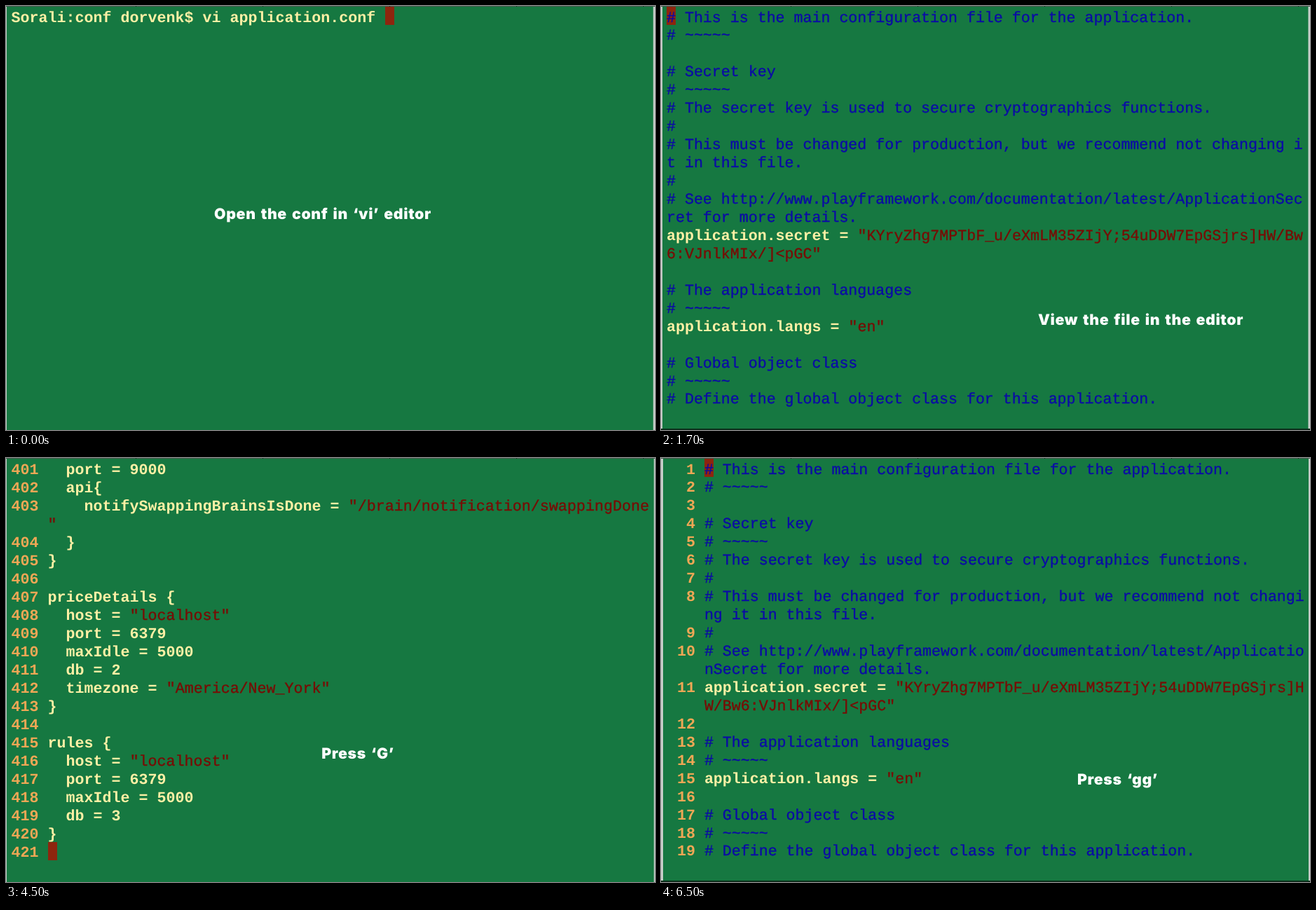
Animation, 926 px wide and 605 px high, one loop 8 s. Source, as an HTML page:

```html
<!DOCTYPE html>
<html lang="en">
<head>
<meta charset="utf-8">
<title>vi walkthrough</title>
<style>
  html, body { margin: 0; width: 100%; height: 100%; overflow: hidden; background: #167841; }
  svg { display: block; position: absolute; left: 0; top: 0; }
  text { white-space: pre; text-rendering: geometricPrecision; }
  .code { font-family: "Liberation Mono", "Courier New", monospace; stroke-width: .35px; }
  .bold { font-weight: 700; stroke-width: 0; }
  .caption {
    font: 900 21.3px Inter, "Arial Black", sans-serif;
    letter-spacing: .03em; word-spacing: .1em;
    text-anchor: middle; fill: #fff;
  }
</style>
</head>
<body>
<svg id="stage" width="926" height="605" viewBox="0 0 926 605"></svg>
<script>
const COLS = 70, GUTTER = 4, LOOP = 8000;
const C = {
  bg: '#167841', plain: '#fff0a5', note: '#0b0ba6', str: '#780c05',
  num: '#f0a755', cursor: '#8e250e', edge: '#c9cfcb', top: '#46594e', base: '#0c2f1c'
};

const head = `# This is the main configuration file for the application.
# ~~~~~

# Secret key
# ~~~~~
# The secret key is used to secure cryptographics functions.
#
# This must be changed for production, but we recommend not changing it in this file.
#
# See http://www.playframework.com/documentation/latest/ApplicationSecret for more details.
application.secret = "KYryZhg7MPTbF_u/eXmLM35ZIjY;54uDDW7EpGSjrs]HW/Bw6:VJnlkMIx/]<pGC"

# The application languages
# ~~~~~
application.langs = "en"

# Global object class
# ~~~~~
# Define the global object class for this application.`;

const tail = `  port = 9000
  api{
    notifySwappingBrainsIsDone = "/brain/notification/swappingDone"
  }
}

priceDetails {
  host = "localhost"
  port = 6379
  maxIdle = 5000
  db = 2
  timezone = "America/New_York"
}

rules {
  host = "localhost"
  port = 6379
  maxIdle = 5000
  db = 3
}
`;

// x, y: first column and baseline; w, h: cell size; edges: left, right, bottom of the window
const screens = [
  { at: 0, x: 7.5, y: 22.5, w: 13, h: 26, edges: [1, 923.5, 605],
    text: 'Sorali:conf dorvenk$ vi application.conf ', cursor: [41, 0],
    caption: ['Open the conf in ‘vi’ editor', 452, 303.5] },
  { at: 500, x: 8, y: 22.5, w: 12.98, h: 25.95, edges: [2, 923.5, 603],
    text: head, cursor: [0, 0],
    caption: ['View the file in the editor', 684.5, 455] },
  { at: 2500, x: 7, y: 21, w: 13.03, h: 26.1,
    text: head, first: 1, cursor: [4, 0], command: ':set number',
    caption: ['On the no-line', 633.5, 448] },
  { at: 4500, x: 7.5, y: 22.5, w: 13.01, h: 26.04, edges: [1, 924.5, 605],
    text: tail, first: 401, cursor: [4, 21],
    caption: ['Press ‘G’', 502, 428.5] },
  { at: 6500, x: 10, y: 22.5, w: 12.97, h: 25.95, edges: [3, 924, 603],
    text: head, first: 1, cursor: [4, 0],
    caption: ['Press ‘gg’', 651.5, 466] }
];

function add(parent, tag, attrs, content) {
  const el = document.createElementNS('http://www.w3.org/2000/svg', tag);
  for (const k in attrs) el.setAttribute(k, attrs[k]);
  if (content) el.textContent = content;
  parent.appendChild(el);
  return el;
}

function box(g, x, y, width, height, fill) {
  add(g, 'rect', { x, y, width, height, fill });
}

function write(g, s, col, row, str, fill) {
  if (!str.trim()) return;
  const bold = fill === C.plain || fill === C.num;
  add(g, 'text', {
    class: bold ? 'code bold' : 'code', fill, stroke: fill,
    x: s.x + col * s.w, y: s.y + row * s.h, 'font-size': s.w / 0.6001
  }, str);
}

function drawLine(g, s, line, row, indent) {
  const quote = line.indexOf('"');
  const split = line[0] === '#' ? 0 : quote < 0 ? line.length : quote;
  const rest = line[0] === '#' ? C.note : C.str;
  const width = COLS - indent;
  let i = 0;
  do {
    const end = Math.min(i + width, line.length);
    const mid = Math.max(i, Math.min(split, end));
    write(g, s, indent, row, line.slice(i, mid), C.plain);
    write(g, s, indent + mid - i, row, line.slice(mid, end), rest);
    i += width;
    row++;
  } while (i < line.length);
  return row;
}

function drawEdges(g, [left, right, bottom]) {
  box(g, 0, 0, left, 605, C.edge);
  box(g, right, 0, 926 - right, 605, C.edge);
  box(g, 0, 0, 926, 1, C.top);
  for (let x = 185; x < 926; x += 181) box(g, x, 0, 1, 1, '#1b2620');
  if (bottom < 605) box(g, 0, bottom, 926, 605 - bottom, C.base);
}

function build(s) {
  const g = add(stage, 'g', {});
  box(g, 0, 0, 926, 605, C.bg);
  if (s.edges) drawEdges(g, s.edges);

  const [cc, cr] = s.cursor;
  box(g, Math.round(s.x + cc * s.w), Math.round(s.y - 21.5 + cr * s.h), 13, 26, C.cursor);

  const indent = s.first ? GUTTER : 0;
  let row = 0;
  s.text.split('\n').forEach((line, i) => {
    if (s.first) write(g, s, 0, row, String(s.first + i).padStart(3), C.num);
    row = drawLine(g, s, line, row, indent);
  });

  if (s.command) {
    write(g, s, 0, row, s.command, C.plain);
    add(g, 'ellipse', { cx: 81, cy: 590, rx: 79.5, ry: 19, fill: 'none', stroke: '#000', 'stroke-width': 3 });
  }
  const [str, x, y] = s.caption;
  add(g, 'text', { class: 'caption', x, y }, str);
  return g;
}

const stage = document.getElementById('stage');
const layers = screens.map(build);
const start = performance.now();

function tick(now) {
  const t = Math.max(0, now - start) % LOOP;
  const current = screens.findLastIndex(s => s.at <= t);
  layers.forEach((g, i) => { g.style.display = i === current ? '' : 'none'; });
  requestAnimationFrame(tick);
}
tick(start);
</script>
</body>
</html>
```
